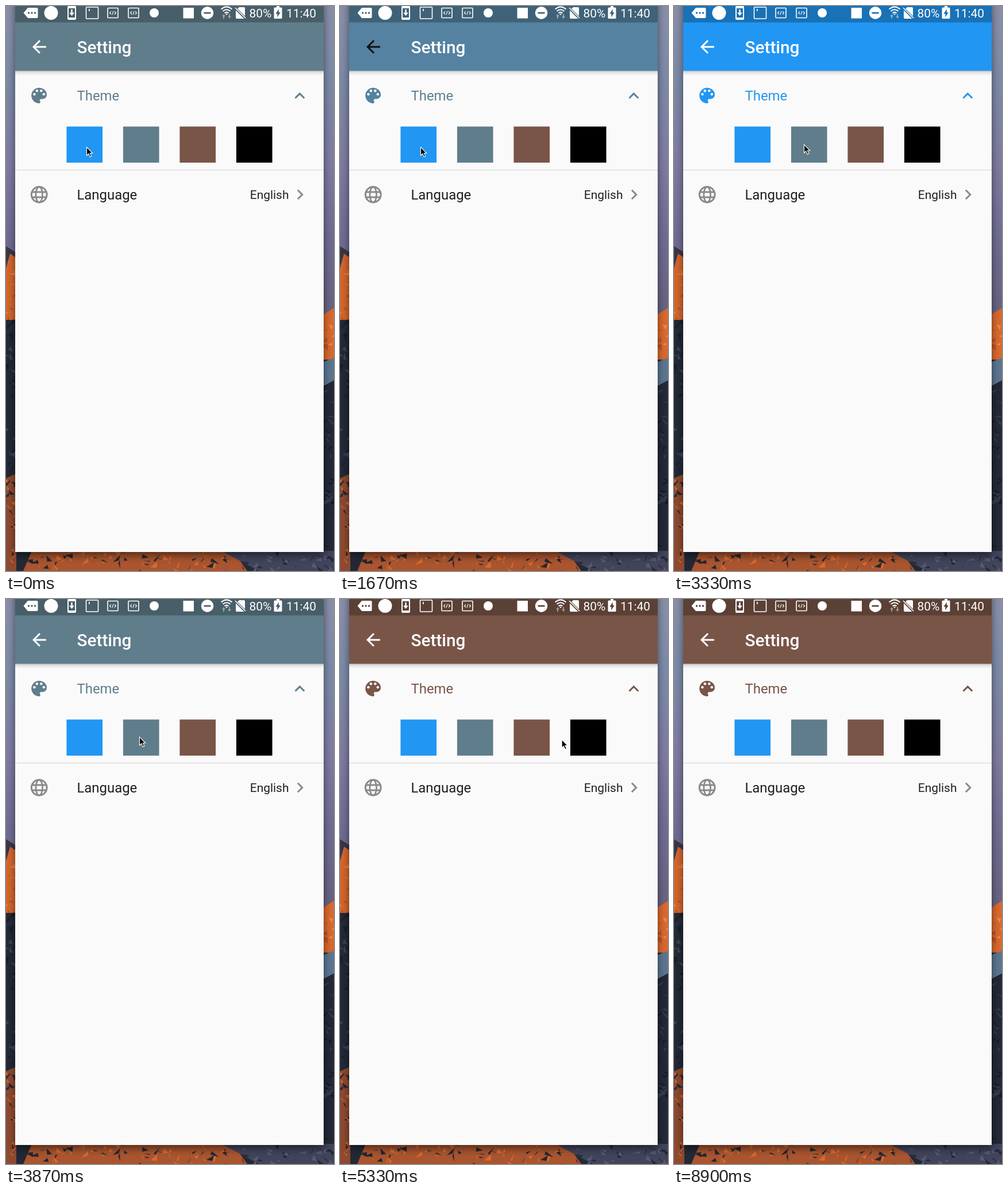
Recreate the animation shown at these times as an HTML page. Size 571 by 981 pixels, loop 9.06 s.

```html
<!DOCTYPE html>
<html lang="en">
<head>
<meta charset="utf-8">
<title>Theme setting</title>
<style>
  html, body { margin: 0; width: 100%; height: 100%; overflow: hidden; background: #262b38; }
  svg { display: block; font-family: Roboto, "Noto Sans", sans-serif; }
  .theme { fill: var(--theme); }
  .line { fill: none; stroke: #fff; stroke-width: 1.6; }
</style>
</head>
<body>
<svg id="stage" width="571" height="981" viewBox="0 0 571 981">
  <defs>
    <linearGradient id="sky" x1="0" y1="0" x2="0" y2="1">
      <stop offset="0" stop-color="#8a8fa9"/>
      <stop offset=".22" stop-color="#7c8ba8"/>
      <stop offset=".5" stop-color="#7f7ca1"/>
      <stop offset=".75" stop-color="#6f6c92"/>
      <stop offset="1" stop-color="#67627f"/>
    </linearGradient>
    <linearGradient id="drop" x1="0" y1="0" x2="0" y2="1">
      <stop offset="0" stop-opacity=".24"/>
      <stop offset=".4" stop-opacity=".09"/>
      <stop offset="1" stop-opacity="0"/>
    </linearGradient>
    <filter id="blur" x="-10%" y="-10%" width="120%" height="120%">
      <feGaussianBlur stdDeviation="7"/>
    </filter>
  </defs>

  <!-- Wallpaper -->
  <g>
    <rect width="571" height="540" fill="url(#sky)"/>
    <rect y="538" width="571" height="443" fill="#232936"/>
    <path d="M0 417L18 428V545H0z" fill="#d3662d"/>
    <path d="M0 417L16 427V436L7 430 0 455z" fill="#38374a"/>
    <path d="M0 820L18 812V981H0z" fill="#8d4a30"/>
    <path d="M552 536L571 524V614H552z" fill="#d8692f"/>
    <path d="M552 618L571 611V650L552 660z" fill="#5c7590"/>
    <path d="M45 946H395L420 981H30z" fill="#a9552f"/>
    <path d="M375 946H571V981H440z" fill="#41445a"/>
    <g id="rocks"></g>
  </g>
  <rect x="16" y="-10" width="537" height="964" opacity=".5" filter="url(#blur)"/>

  <!-- Screen -->
  <rect x="16" width="537" height="948" fill="#fafafa"/>
  <rect x="16" y="112" width="537" height="9" fill="url(#drop)"/>
  <rect class="theme" x="16" width="537" height="112.5"/>
  <rect x="16" width="537" height="28.5" opacity=".25"/>

  <!-- Status bar -->
  <g fill="#fff">
    <path d="M38 3H53.500Q55.500 3 55.500 5V19Q55.500 21 53.500 21H38L30.500 12z"/>
    <g style="fill:var(--status)">
      <circle cx="39.500" cy="12" r="1.700"/><circle cx="45" cy="12" r="1.700"/><circle cx="50.500" cy="12" r="1.700"/>
    </g>
    <circle cx="78.500" cy="12" r="12"/>
    <path d="M109 0H120Q122 0 122 2V22Q122 24 120 24H109Q107 24 107 22V2Q107 0 109 0zM109 4V20H120V4z" fill-rule="evenodd"/>
    <path d="M113.300 6H115.700V11.500H119L114.500 17 110 11.500H113.300z"/>
    <rect class="line" x="139.500" y="2" width="21" height="20" rx="1"/>
    <path d="M144 5h1.700v4h-1.700z"/>
    <g id="code" class="line">
      <rect x="177" y="3.500" width="18" height="17" rx="1"/>
      <path d="M183 9.500L180.500 12 183 14.500M189 9.500L191.500 12 189 14.500M187 9L185 15" style="stroke-width:1.100"/>
    </g>
    <use href="#code" x="36"/>
    <circle cx="258" cy="12" r="8"/>
    <rect x="308.500" y="3" width="18.500" height="18.500"/>
    <circle cx="350.500" cy="12" r="10.700"/>
    <rect x="344.500" y="10.700" width="12" height="2.700" style="fill:var(--status)"/>
    <g class="line" style="stroke-width:2">
      <path d="M374.500 5.500Q384 -2.500 393.500 5.500M377.500 9Q384 3.500 390.500 9M380.500 12.300Q384 9.500 387.500 12.300"/>
    </g>
    <path d="M381.800 13.500H386.200L384 16z"/>
    <path d="M376 18L379 14 382 18H380V22H378V18zM386 18H388V14H390V18H392L389 22z" opacity=".45"/>
    <path d="M406 2H414Q416 2 416 4V17.500L403 4.800zM400 7.500L414.500 22H402Q400 22 400 20z"/>
    <path class="line" d="M399 3L417 21"/>
    <path d="M471 2.500V0H476V2.500H479Q480.500 2.500 480.500 4V20.500Q480.500 22 479 22H468Q466.500 22 466.500 20.500V4Q466.500 2.500 468 2.500z"/>
    <path d="M474.800 5.500V11H477.700L472.300 19.500V13.500H469.300z" style="fill:var(--status)"/>
    <g font-size="20.900">
      <text x="423.500" y="20">80%</text>
      <text x="488" y="20">11:40</text>
    </g>
  </g>

  <!-- App bar -->
  <path transform="translate(40 53) scale(1.4917)" style="fill:var(--arrow)"
    d="M20 11H7.830L13.420 5.410 12 4 4 12 12 20 13.410 18.590 7.830 13H20z"/>
  <text x="123.500" y="82" font-size="29.800" font-weight="500" fill="#fff">Setting</text>

  <!-- Theme row -->
  <g transform="translate(39.700 137.600) scale(1.4917)">
    <path class="theme" d="M12 3C7.030 3 3 7.030 3 12S7.030 21 12 21C12.830 21 13.500 20.330 13.500 19.500 13.500 19.110 13.350 18.760 13.110 18.490 12.880 18.230 12.730 17.880 12.730 17.500 12.730 16.670 13.400 16 14.230 16H16C18.760 16 21 13.760 21 11 21 6.580 16.970 3 12 3z"/>
    <g fill="#fafafa">
      <circle cx="6.500" cy="10.500" r="1.500"/><circle cx="9.500" cy="6.500" r="1.500"/>
      <circle cx="14.500" cy="6.500" r="1.500"/><circle cx="17.500" cy="10.500" r="1.500"/>
    </g>
  </g>
  <text x="123.500" y="164" font-size="23.900" style="fill:var(--label)">Theme</text>
  <path class="theme" transform="translate(493.500 138) scale(1.4917)" d="M12 8L6 14 7.410 15.410 12 10.830 16.590 15.410 18 14z"/>

  <g id="swatches"></g>
  <rect x="16" y="284" width="537" height="1.500" fill="#dedede"/>

  <!-- Language row -->
  <g transform="translate(57.700 327.500) scale(1.4917)" fill="none" stroke="#898989" stroke-width="2">
    <circle r="9"/><ellipse rx="3.900" ry="9" stroke-width="1.800"/><path d="M-8 -3H8M-8 3H8"/>
  </g>
  <g fill="#1f1f1f">
    <text x="123.500" y="336" font-size="23.900">Language</text>
    <text x="424.800" y="335" font-size="20.900">English</text>
  </g>
  <path transform="translate(494 309.500) scale(1.4917)" fill="#898989" d="M10 6L8.590 7.410 13.170 12 8.590 16.590 10 18 16 12z"/>

  <path id="cursor" d="M0 0V14.500L3.300 11.500 5.700 17 8.200 16 5.900 10.500H10.200z" stroke="#fff" stroke-width="1.100"/>
</svg>

<script>
const LOOP = 9060, STEP = 1000 / 15;
const BLUE = [33, 150, 243], GREY = [96, 125, 139], BROWN = [121, 85, 72], BLACK = [0, 0, 0];
const stage = document.getElementById('stage');
const cursor = document.getElementById('cursor');

// Theme switches: start time, from, to
const switches = [[1627, GREY, BLUE], [3360, BLUE, GREY], [4560, GREY, BROWN]];
const FADE = 200;
// The label trails behind the rest: time after the start, share of the change
const labelLag = [[0, 0], [106, .15], [173, .35], [240, .75], [430, .75], [440, .93], [500, 1]];

// Pointer: time, x, y
const path = [
  [0, 140.5, 245], [2200, 140.5, 245], [2700, 180, 247], [3100, 222, 242], [3333, 226.5, 240.5],
  [3730, 232.5, 239.5], [4000, 232.5, 239.5], [4330, 337, 241], [5170, 341, 242],
  [5333, 386, 244], [5530, 417, 241], [7420, 417, 241], [7530, 380, 250], [7600, 357, 247]
];
const CURSOR_OFF = 7930;

const rgb = c => `rgb(${c.map(Math.round)})`;
const mix = (a, b, p) => a.map((v, i) => v + (b[i] - v) * p);

function sample(rows, t) {
  const i = rows.findIndex(r => r[0] > t);
  if (i < 0) return rows[rows.length - 1].slice(1);
  if (i === 0) return rows[0].slice(1);
  const a = rows[i - 1], b = rows[i];
  return mix(a.slice(1), b.slice(1), (t - a[0]) / (b[0] - a[0]));
}

let seed = 7;
const random = () => (seed = seed * 16807 % 2147483647) / 2147483647;

// Loose flat chips for the rock: x, y, width, height, count, colours
const rocks = [
  [0, 460, 16, 78, 10, ['#e8853f', '#b5502a']],
  [0, 545, 16, 265, 34, ['#39435a', '#171c28']],
  [0, 822, 16, 150, 30, ['#d0662f', '#222633']],
  [553, 545, 18, 60, 8, ['#ec8a48', '#b9542c']],
  [553, 660, 18, 300, 36, ['#343c52', '#151a25']],
  [30, 948, 360, 33, 70, ['#d86a2f', '#262632']],
  [390, 948, 181, 33, 30, ['#565a74', '#242838']]
];

document.getElementById('rocks').innerHTML = rocks.map(([x, y, w, h, count, colours]) =>
  Array.from({ length: count }, (_, i) => {
    const corner = () => `${(random() * 16 - 8).toFixed(1)} ${(random() * 16 - 8).toFixed(1)}`;
    const left = (x + random() * w).toFixed(1), top = (y + random() * h).toFixed(1);
    return `<path transform="translate(${left} ${top})" fill="${colours[i % 2]}"
      d="M${corner()}L${corner()} ${corner()}z"/>`;
  }).join('')).join('');

document.getElementById('swatches').innerHTML = [BLUE, GREY, BROWN, BLACK]
  .map((c, i) => `<rect x="${105.4 + i * 98.5}" y="209.300" width="62.650" height="62.650" fill="${rgb(c)}"/>`)
  .join('');

function draw(time) {
  const t = Math.floor((time + 4) / STEP) * STEP;
  const [start, from, to] = switches.filter(s => s[0] <= t).pop() || switches[0];
  const p = Math.min(1, Math.max(0, (t - start) / FADE));
  const theme = mix(from, to, p);
  const label = mix(from, to, sample(labelLag, t - start)[0]);
  const vars = {
    theme: rgb(theme),
    status: rgb(mix(theme, BLACK, .25)),
    label: rgb(label),
    arrow: p > 0 && p < 1 ? '#111' : '#fff'
  };
  for (const name in vars) stage.style.setProperty('--' + name, vars[name]);

  const [x, y] = sample(path, t);
  cursor.setAttribute('transform', `translate(${x.toFixed(1)} ${y.toFixed(1)})`);
  cursor.setAttribute('visibility', time < CURSOR_OFF ? 'visible' : 'hidden');
}

const begin = performance.now();
function tick() {
  draw((performance.now() - begin) % LOOP);
  requestAnimationFrame(tick);
}
tick();
</script>
</body>
</html>
```
